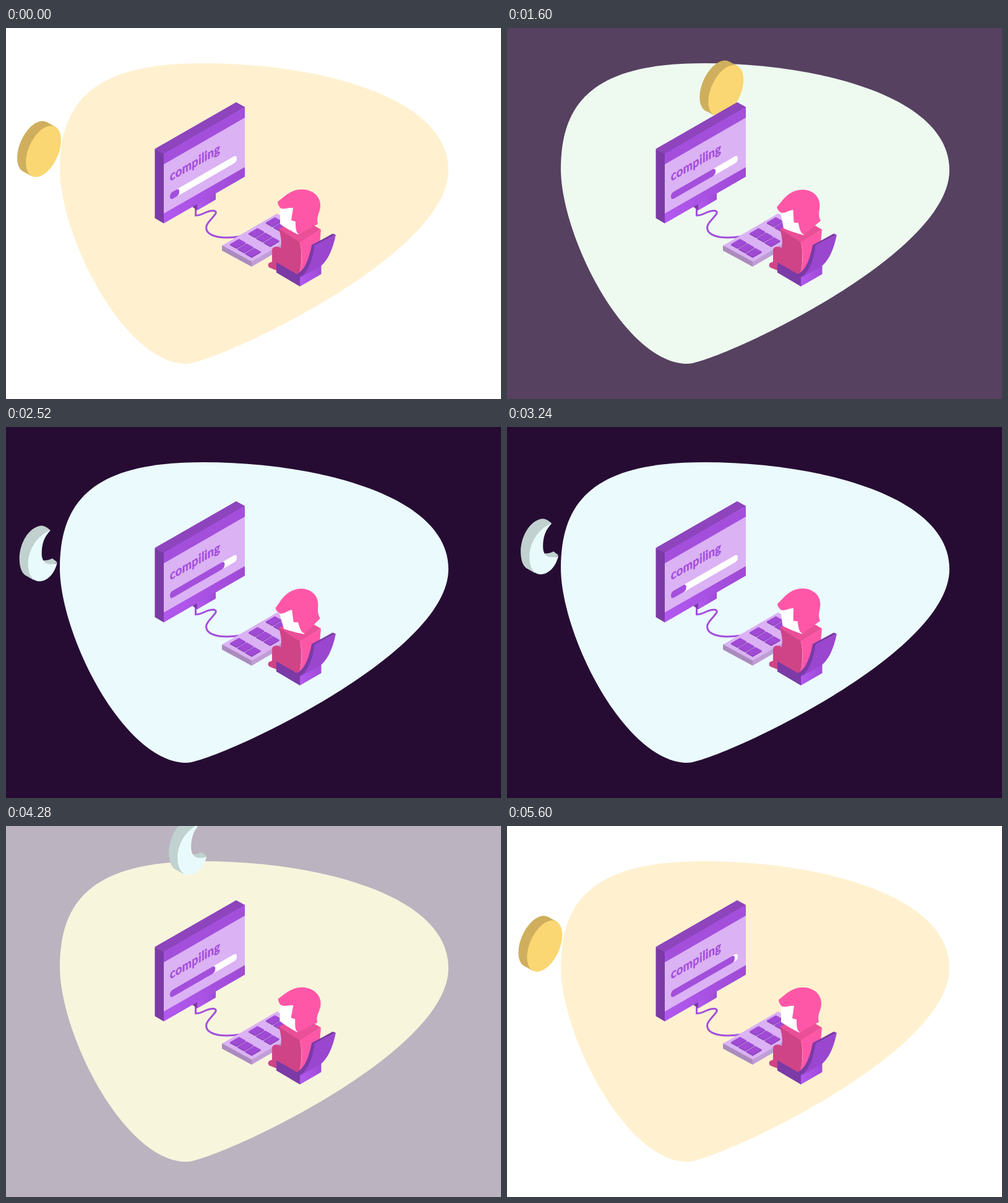
Animation, 800 px wide and 600 px high, one loop 5640 ms. Source, as an HTML page:

```html
<!DOCTYPE html>
<html lang="en">
<head>
<meta charset="utf-8">
<title>Compiling day and night</title>
<style>
  html, body { margin: 0; width: 100%; height: 100%; overflow: hidden; background: #fff; }
  svg { display: block; width: 800px; height: 600px; }
  .label { font: 700 21px Lato, sans-serif; letter-spacing: .4px; stroke: #a34fdc; stroke-width: .6px; }
  .dark { fill: #7b3aa6; }
  .mid { fill: #8e44bd; }
  .main { fill: #a34fdc; }
  .pale { fill: #dbb2f4; }
  .glow { fill: url(#glow); }
</style>
</head>
<body>
<svg viewBox="0 0 800 600">
  <defs>
    <linearGradient id="glow">
      <stop offset="0" stop-color="#b259ef"/>
      <stop offset="1" stop-color="#9f4ad6"/>
    </linearGradient>
    <g id="key" stroke-width=".6" stroke-linejoin="round">
      <path d="M362 351l14.500-8.500 10.500 5.800-14.500 8.500z" fill="#7b3aa6" stroke="#7b3aa6"/>
      <path d="M362 349.800l14.500-8.500 10.500 5.800-14.500 8.500z" fill="#a04ad6" stroke="#a04ad6"/>
    </g>
    <g id="keys">
      <use href="#key"/>
      <use href="#key" x="12.300" y="7.300"/>
      <use href="#key" x="24.600" y="14.600"/>
    </g>
    <!-- the way out from behind the monitor, and back over the top -->
    <path id="arrive" d="M303 166C150 300 10 320 18 151"/>
    <path id="leave" d="M18 151C20 110 45 45 91 -7C130 -45 290 -45 312 56L308 166"/>
  </defs>

  <rect id="sky" width="800" height="600"/>
  <path id="blob" d="M87 228C87 112 150 57 320 57C490 57 715 106 715 230C715 370 335 543 292 543C190 543 87 335 87 228Z"/>

  <!-- sun and moon are drawn with the top left of their box at 0,0 -->
  <g id="sun">
    <g fill="#cfaf5d">
      <circle r="1" transform="matrix(28.5 -18 0 37.4 28.5 41)"/>
      <path d="M61.500 8.600L23.500 88.400L9.500 80.900L47.500 1.100Z"/>
    </g>
    <circle r="1" transform="matrix(28.5 -18 0 37.4 42.5 48.5)" fill="#fad772"/>
  </g>
  <g id="moon" transform="translate(22 160)">
    <g fill="#c1d1cf">
      <path d="M35 0C14 3 0 30 0 53C0 68 4 76 9 80L23 88L30 70L32 30L50 7.500C45 3 40 0 35 0Z"/>
      <path d="M37 56C44 57 49 55 53 53L61 59C56 63 48 65 43 62Z"/>
    </g>
    <path d="M50 7.500C28 16 14 40 14 62C14 80 22 90 32 90C44 90 56 80 61 60C57 62 52 63 46 62C39 60 36 54 36 45C36 30 40 18 50 7.500Z" fill="#e9fafc"/>
  </g>

  <!-- cable and monitor -->
  <path d="M306.500 292V303C318 304 324 294 336 295.500C347 298 327 310 324 320C321 334 340 343 379 337" fill="none" stroke="#a34fdc" stroke-width="3"/>
  <path class="dark" d="M301 289L309 284V295Z"/>
  <path class="glow" d="M309 284L339 266V277.500L309 295Z"/>
  <path class="mid" d="M240.500 195.500L372 120L386.500 128L255 204Z"/>
  <path class="dark" d="M240.500 195.500L255 203.500V316L240.500 307.500Z"/>
  <path class="main" d="M255 203.500L386 128V146L255 222Z"/>
  <path class="pale" d="M255 220.500L386 145V226L255 301Z"/>
  <path class="glow" d="M255 300L386 225V240.500L255 316Z"/>
  <text class="label main" transform="matrix(.866 -.5 0 1 265 248)">compiling</text>
  <g transform="matrix(1 -.577 0 1 265 273)">
    <rect y="-5.800" width="108" height="11.600" rx="5" fill="#fff"/>
    <rect id="bar" class="main" y="-5.800" height="11.600" rx="5"/>
  </g>

  <!-- keyboard -->
  <path class="pale" d="M349 352L438 300L486 327L397 377.500Z"/>
  <path d="M349 351.500L397 377.500V386L349 360Z" fill="#ab8bbe"/>
  <path d="M397 377.500L450 347V355L397 386Z" fill="#c19dd8"/>
  <use href="#keys"/>
  <use href="#keys" x="30" y="-17.500"/>
  <use href="#keys" x="58" y="-35"/>

  <!-- body -->
  <path d="M441 325L470 309L485 312L509 326L475 347Z" fill="#ea4f97"/>
  <path d="M441 325L475 346.500C479 365 478 385 473 400L437 392L427 388C423 387 423 382 425 380L430 378V358C433 352 440 353 444 356C446 345 444 335 441 325Z" fill="#cf4486"/>
  <path d="M475 346.500L509 326L507 348L495 353L490 376L473 399C479 382 479 365 475 346.500Z" fill="#ff57a8"/>

  <g id="head">
    <path d="M443 290V317C450 322 460 328 472 334L480 329L470 288Z" fill="#fff"/>
    <path d="M439 281C448 275 459 261 478 261C497 261 508 274 508 286C508 300 501 302 504 317L473 333.500C468 330 468 322 468 313L461 311L464 291C456 290 451 294 444 291.500C441 289 439 285 439 281Z" fill="#ff57a8"/>
  </g>

  <!-- chair -->
  <path class="dark" d="M437 379L470 398C483 392 490 372 494 351L500 348C497 375 488 398 475 404V418L437 395.500Z"/>
  <path class="glow" d="M475 403L509.500 383V398L475 418Z"/>
  <path class="dark" d="M494 351L528 332.500L533 334.500L499 352Z"/>
  <path d="M498.500 351.500L533 334.500C528 358 521 374 510 384L475 404C488 395 496 375 498.500 351.500Z" fill="#9a46cf"/>
</svg>
<script>
  const LOOP = 5640, HALF = LOOP / 2, STEP = 40;
  const LEAVE_TIME = 1690;
  const DAY = { sky: [255, 255, 255], blob: [255, 241, 208] };
  const NIGHT = { sky: [38, 12, 51], blob: [235, 250, 252] };
  const TWILIGHT = [238, 250, 241], TWILIGHT_AT = .8;

  const $ = id => document.getElementById(id);
  const ramp = (t, from, to) => Math.min(1, Math.max(0, (t - from) / (to - from)));
  const smooth = (t, from, to) => .5 - .5 * Math.cos(Math.PI * ramp(t, from, to));
  const lerp = (a, b, u) => a + (b - a) * u;
  const rgb = (a, b, u) => `rgb(${a.map((c, i) => Math.round(lerp(c, b[i], u)))})`;

  // age counts from the moment of rest at the left; before it the body slows down, after it speeds up
  function travel(id, age, arriveTime) {
    const el = $(id), arriving = age < 0;
    const shown = age > -arriveTime && age < LEAVE_TIME;
    el.setAttribute('visibility', shown ? 'visible' : 'hidden');
    if (!shown) return;
    const path = $(arriving ? 'arrive' : 'leave');
    const part = arriving ? 1 - (-age / arriveTime) ** 2.5 : (age / LEAVE_TIME) ** 4.2;
    const p = path.getPointAtLength(part * path.getTotalLength());
    const inset = id === 'moon' ? 4 : 0;
    el.setAttribute('transform', `translate(${p.x + inset} ${p.y})`);
  }

  function paint(night) {
    $('sky').setAttribute('fill', rgb(DAY.sky, NIGHT.sky, night));
    $('blob').setAttribute('fill', night < TWILIGHT_AT
      ? rgb(DAY.blob, TWILIGHT, night / TWILIGHT_AT)
      : rgb(TWILIGHT, NIGHT.blob, (night - TWILIGHT_AT) / (1 - TWILIGHT_AT)));
  }

  // the bar fills twice per loop, slowing towards its end
  function progress(t) {
    const done = 1 - (1 - t % HALF / HALF) ** 1.7;
    return t < HALF ? lerp(15, 90, done) : lerp(0, 103, done);
  }

  const nod = t => -11.5 * smooth(t, 0, 1200) - 4.5 * smooth(t, 1700, 2500)
    + 23.5 * smooth(t, 2800, 3850) - 7.5 * smooth(t, 3880, 4550);

  function draw(now) {
    const t = Math.floor(now / STEP) * STEP % LOOP;
    paint(smooth(t, 1000, 1870) - ramp(t, 3600, 4420) ** 2);
    travel('sun', t < HALF ? t : t - 5040, 600);
    travel('moon', t - 2760, 1120);
    $('head').setAttribute('transform', `rotate(${nod(t)} 480 300)`);
    $('bar').setAttribute('width', progress(t));
  }

  const start = performance.now();
  function tick() {
    draw(performance.now() - start);
    requestAnimationFrame(tick);
  }
  tick();
</script>
</body>
</html>
```
